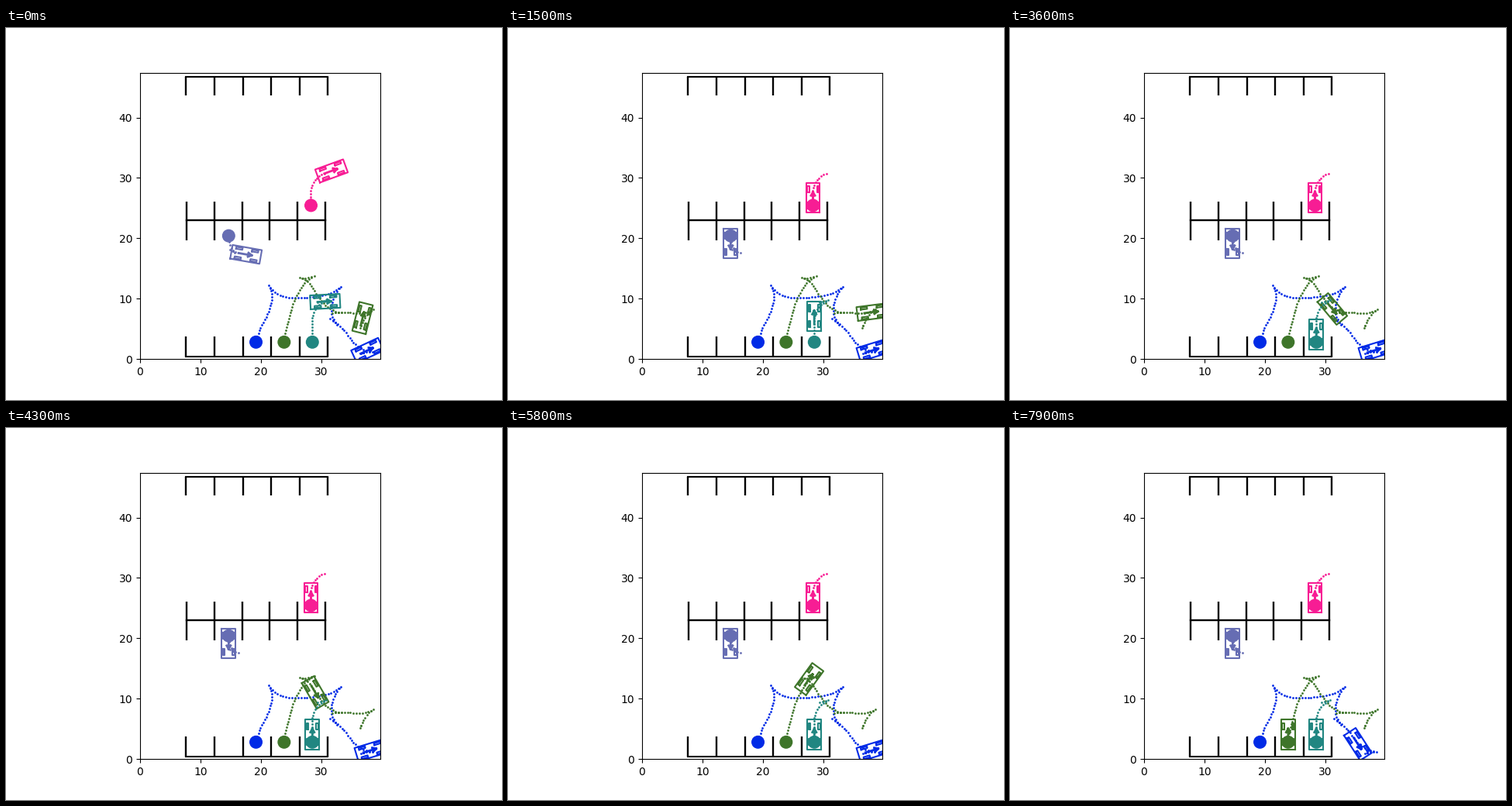
Animation of 640x480 px, one loop 8 s. Source, as a matplotlib script:

```python
import numpy as np
import matplotlib.pyplot as plt
from matplotlib.animation import FuncAnimation

TICKS = 80
PAUSES = (1, 3, 26)  # ticks on which nothing moves
STRIDE = 0.5         # metres driven per step

REAR, FRONT, HALF_WIDTH = 1.2, 3.72, 1.15
WHEELBASE, TRACK = 2.65, 0.8
WHEEL_HALF, WHEEL_THICK = 0.53, 0.16
ARROW = 2.2

FWD, BACK, WAIT = 1, -1, 0


def to_step(tick):
    return tick - sum(tick >= p for p in PAUSES)


def drive(start, heading, goal, moves):
    """Rear axle poses, one per step; each move is (gear, steps, turn)."""
    points, angles, driven = [np.array(start)], [np.radians(heading)], [0]
    for gear, steps, turn in moves:
        bend = np.radians(turn) / steps
        for _ in range(steps):
            course = angles[-1] + bend / 2
            points.append(points[-1] + gear * STRIDE
                          * np.array([np.cos(course), np.sin(course)]))
            angles.append(angles[-1] + bend)
            driven.append(driven[-1] + abs(gear))
    # Spread the small miss at the goal evenly over the driven way.
    share = np.array(driven)[:, None] / driven[-1]
    return np.array(points) + share * (goal - points[-1]), angles


ROUTES = {
    "#f71d94": drive((30.53, 30.73), 20, (28.31, 25.45), [
        (BACK, 6, 45), (BACK, 3, 25), (BACK, 4, 0)]),
    "#666db3": drive((16.31, 17.56), -10, (14.68, 20.42), [
        (BACK, 3, -24), (FWD, 2, -14), (BACK, 6, -42)]),
    "#002ae6": drive((36.53, 0.9), 25, (19.2, 2.81), [
        (FWD, 1, -8), (WAIT, 63, 0), (FWD, 3, -24),
        (BACK, 9, -50), (BACK, 9, 25), (FWD, 3, -18),
        (BACK, 7, -50), (BACK, 7, -35),
        (FWD, 5, -30), (FWD, 12, -17), (FWD, 9, -53),
        (BACK, 5, -45), (BACK, 8, -20), (BACK, 7, 20)]),
    "#3e752a": drive((36.55, 5.58), 76, (23.86, 2.81), [
        (BACK, 1, -3), (FWD, 5, -21), (FWD, 3, -20),
        (BACK, 6, -37), (BACK, 4, 0), (BACK, 4, 21), (FWD, 3, -21),
        (BACK, 7, -45), (BACK, 7, -10), (BACK, 5, 52), (FWD, 5, 30),
        (BACK, 5, 32), (BACK, 8, 20), (BACK, 8, 0), (BACK, 4, 16)]),
    "#218681": drive((29.4, 9.46), 3, (28.54, 2.81), [
        (FWD, 3, 19), (BACK, 9, 68), (BACK, 7, 0)]),
}


def box(x0, x1, y0, y1):
    return [(x0, y0), (x1, y0), (x1, y1), (x0, y1), (x0, y0),
            (np.nan, np.nan)]


def car_shape():
    shape = box(-REAR, FRONT, -HALF_WIDTH, HALF_WIDTH)
    for x in (0, WHEELBASE):
        for y in (-TRACK, TRACK):
            shape += box(x - WHEEL_HALF, x + WHEEL_HALF,
                         y - WHEEL_THICK, y + WHEEL_THICK)
    return np.array(shape)


def arrow_shape():
    barb = 0.3 * ARROW
    back, side = ARROW - barb * np.cos(np.pi / 6), barb / 2
    gap = (np.nan, np.nan)
    return np.array([(0, 0), (ARROW, 0), gap, (ARROW, 0), (back, side), gap,
                     (ARROW, 0), (back, -side)])


def place(shape, xy, heading):
    c, s = np.cos(heading), np.sin(heading)
    return (shape @ np.array([[c, s], [-s, c]]) + xy).T


def draw_bays(ax, first, pitch, wall, low, high, wall_width):
    xs = first + pitch * np.arange(6)
    ax.plot([xs[0], xs[-1]], [wall, wall], color="black", lw=wall_width)
    ax.vlines(xs, low, high, color="black", lw=1.7)


fig, ax = plt.subplots(figsize=(6.4, 4.8), dpi=100)
ax.set_aspect("equal")

draw_bays(ax, 7.62, 4.7, 46.8, 43.7, 46.8, 1.5)
draw_bays(ax, 7.7, 4.6, 23.0, 19.7, 26.1, 1.7)
draw_bays(ax, 7.62, 4.7, 0.47, 0.47, 3.7, 1.5)

ax.set_xlim(0, 39.8)
ax.set_ylim(0, 47.445)
ax.set_xticks(range(0, 40, 10))
ax.set_yticks(range(0, 50, 10))

BODY, POINTER = car_shape(), arrow_shape()
cars = []
for color, (points, angles) in ROUTES.items():
    ax.plot(*points.T, ls="none", marker="o", ms=2, mew=0, color=color)
    ax.add_patch(plt.Circle(points[-1], 1.0, color=color))
    body, = ax.plot([], [], color=color, lw=1.5)
    pointer, = ax.plot([], [], color=color, lw=2)
    cars.append((points, angles, body, pointer))


def update(tick):
    for points, angles, body, pointer in cars:
        step = min(to_step(tick), len(points) - 1)
        pose = points[step], angles[step]
        body.set_data(*place(BODY, *pose))
        pointer.set_data(*place(POINTER, *pose))
    return [line for car in cars for line in car[2:]]


anim = FuncAnimation(fig, update, frames=TICKS, interval=100, repeat=True,
                     repeat_delay=0)
plt.show()
```
